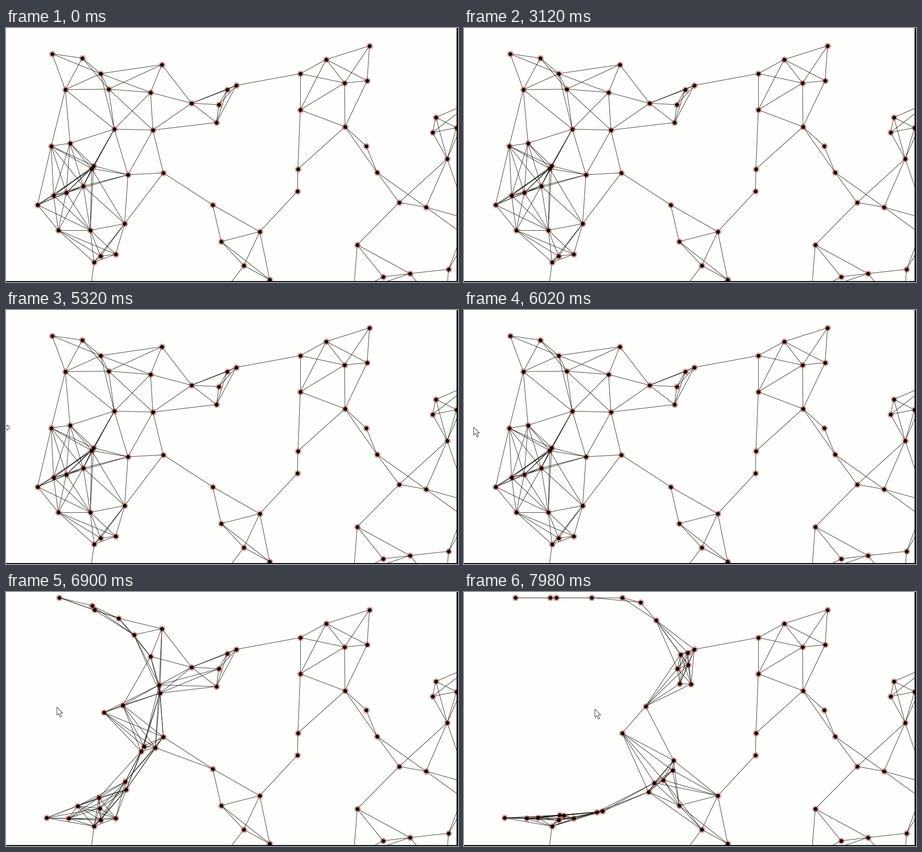
Animation of 960 by 540 pixels, one loop 8000 ms. Source, as a matplotlib script:

```python
import numpy as np
import matplotlib.pyplot as plt
from matplotlib.animation import FuncAnimation
from matplotlib.collections import LineCollection
from matplotlib.patches import Polygon, Rectangle

W, H, DPI = 960, 540, 100
STEP, FRAMES = 40, 200
PX = 72 / DPI
PAPER, LINE, RING = "#fefefd", "#10100a", "#dc4c38"

REACH = 138.6       # nodes closer than this are joined
RADIUS = 234        # how far the pointer pushes nodes
PUSH = 5.1          # px per step while pushed
TOP = 12            # nodes stop at this height
LAG = 150           # ms the push trails the drawn pointer
HOVER, ENTER = 5300, 5900

# Where the nodes rest; a few lie just outside the stage.
REST = np.array([
    (98, 55), (162, 64), (201, 97), (126, 131), (218, 130), (230, 215),
    (96, 251), (136, 245), (186, 293), (182, 299), (259, 312), (164, 336),
    (128, 350), (101, 356), (67, 376), (179, 430), (111, 430), (252, 416),
    (187, 498), (201, 485), (233, 481), (331, 78), (307, 137), (312, 217),
    (334, 308), (394, 160), (447, 201), (452, 163), (470, 131), (489, 122),
    (439, 376), (457, 454), (539, 433), (505, 505), (560, 535), (625, 97),
    (625, 174), (680, 67), (719, 117), (772, 38), (767, 112), (720, 210),
    (765, 251), (620, 300), (619, 347), (788, 307), (835, 371), (892, 381),
    (937, 278), (906, 222), (913, 190), (957, 212), (746, 461), (801, 529),
    (858, 522), (940, 513), (170, 630), (438, 594), (738, 563), (932, 612),
    (980, 445), (981, 406), (990, 157),
], float)

# Pointer path: time, x, y.
PATH = np.array([(5900, 2, 249), (6200, 48, 249), (6340, 56, 249),
                 (6900, 108, 245), (7820, 258, 230), (7980, 278, 249)])

ARROW = np.array([(0, 0), (0, 17), (4, 13.5), (7, 21), (10, 20),
                  (7, 12.5), (12.5, 12.5)])
RESIZE = np.array([(-2, 247), (3, 247), (3, 244), (8, 250), (3, 256),
                   (3, 253), (-2, 253)])


def time_of(i):
    return i * STEP + STEP / 2


def pointer_at(t):
    return np.array([np.interp(t, PATH[:, 0], PATH[:, k]) for k in (1, 2)])


def simulate():
    """Push nodes in reach straight away from the pointer, frame by frame."""
    pos, track = REST.copy(), []
    for i in range(FRAMES):
        t = time_of(i) - LAG
        if t >= ENTER:
            away = pos - pointer_at(t)
            dist = np.hypot(*away.T)[:, None]
            pos = pos + np.where(dist < RADIUS, PUSH * away / dist, 0)
            pos[:, 1] = np.maximum(pos[:, 1], TOP)
        track.append(pos)
    return track


def links(pos):
    a, b = np.triu_indices(len(pos), 1)
    near = np.hypot(*(pos[a] - pos[b]).T) < REACH
    return np.stack([pos[a[near]], pos[b[near]]], axis=1)


track = simulate()

fig = plt.figure(figsize=(W / DPI, H / DPI), dpi=DPI, facecolor=PAPER)
ax = fig.add_axes([0, 0, 1, 1])
ax.set_xlim(0, W)
ax.set_ylim(H, 0)
ax.axis("off")

web = LineCollection([], colors=LINE, linewidths=0.85 * PX, zorder=1)
ax.add_collection(web)
rings, = ax.plot([], [], "o", ms=12 * PX, mfc="none", mec=RING, mew=PX,
                 zorder=2)
dots, = ax.plot([], [], "o", ms=8.6 * PX, mfc="black", mec="none", zorder=3)

for corner in ((957, 0), (0, 538)):
    ax.add_patch(Rectangle(corner, W, H, fc="black", ec="none", zorder=4))

pointer = Polygon(ARROW, closed=True, fc="white", ec="#303028", lw=PX,
                  zorder=5)
ax.add_patch(pointer)


def update(i):
    t, pos = time_of(i), track[i]
    web.set_segments(links(pos))
    rings.set_data(*pos.T)
    dots.set_data(*pos.T)
    pointer.set_visible(t >= HOVER)
    pointer.set_xy(RESIZE if t < ENTER else ARROW + pointer_at(t))
    return web, rings, dots, pointer


anim = FuncAnimation(fig, update, frames=FRAMES, interval=STEP, repeat=True,
                     repeat_delay=0, blit=False)
plt.show()
```
